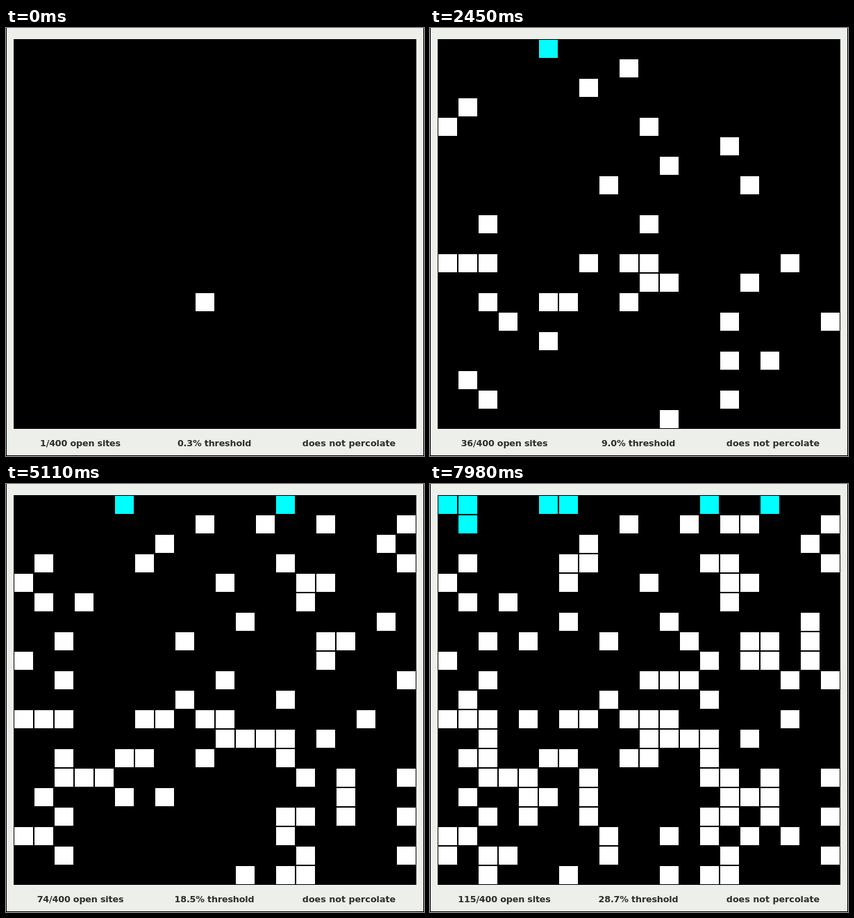
Write an HTML page with a canvas that moves like this. It is 602 px wide and 615 px high and loops after 8000 ms.

```html
<!DOCTYPE html>
<html lang="en">
<head>
<meta charset="utf-8">
<title>Percolation</title>
<style>
  html, body { margin: 0; width: 100%; height: 100%; overflow: hidden; background: #edefea; }
  canvas { display: block; }
</style>
</head>
<body>
<canvas id="stage" width="602" height="615"></canvas>
<script>
const ctx = document.getElementById('stage').getContext('2d');
const SIZE = 20, TOTAL = SIZE * SIZE;
const LOOP = 8000, STEP = 70;

// Sites in the order they open, as row * SIZE + column.
const order = [
  269, 334, 182, 61, 250, 155, 29, 237, 305, 262, 114, 341, 229,
  90, 283, 299, 222, 336, 251, 374, 148, 220, 265, 190, 47,
  255, 362, 5, 230, 131, 294, 80, 391, 221, 266, 227, 253,
  307, 32, 142, 296, 101, 58, 353, 175, 208, 94, 322, 138,
  316, 199, 66, 393, 301, 35, 339, 213, 103, 73, 79, 284,
  340, 95, 379, 273, 160, 394, 13, 226, 39, 282, 156, 333,
  252, 363, 21, 386, 74, 6, 324, 192, 261, 270, 348, 176,
  242, 34, 191, 0, 315, 382, 173, 357, 1, 287, 368, 351,
  178, 197, 327, 152, 201, 293, 67, 224, 355, 126, 314, 231,
  158, 304, 16, 86, 360, 144
];

// Open sites connected to the top row.
function findFull(open) {
  const full = new Set();
  const visit = (row, col) => {
    const site = row * SIZE + col;
    if (row < 0 || col < 0 || row >= SIZE || col >= SIZE) return;
    if (!open.has(site) || full.has(site)) return;
    full.add(site);
    visit(row - 1, col);
    visit(row + 1, col);
    visit(row, col - 1);
    visit(row, col + 1);
  };
  for (let col = 0; col < SIZE; col++) visit(0, col);
  return full;
}

function box(color, x, y, w, h) {
  ctx.fillStyle = color;
  ctx.fillRect(x, y, w, h);
}

function label(text, x, spacing) {
  ctx.letterSpacing = spacing;
  ctx.fillText(text, x, 601);
}

function draw(count) {
  const open = new Set(order.slice(0, count));
  const full = findFull(open);
  const percolates = [...full].some(site => site >= TOTAL - SIZE);

  box('#000', 0, 0, 602, 615);
  box('#edefea', 1, 0, 600, 614);
  box('#000', 11, 16, 580, 560);
  for (const site of open) {
    const row = Math.floor(site / SIZE), col = site % SIZE;
    box(full.has(site) ? '#0ff' : '#fff', 12 + col * 29, 17 + row * 28, 27, 26);
  }

  ctx.fillStyle = '#2e2e2e';
  ctx.font = 'bold 12.7px "DejaVu Sans", sans-serif';
  ctx.textAlign = 'center';
  label(`${count}/${TOTAL} open sites`, 107, '-0.15px');
  label(`${(count / TOTAL * 100).toFixed(1)}% threshold`, 300, '-0.15px');
  label(percolates ? 'percolates' : 'does not percolate', 494, '0px');
}

const start = performance.now();
let shown = 0;

function tick() {
  const time = (performance.now() - start) % LOOP;
  const count = Math.min(order.length, Math.floor(time / STEP) + 1);
  if (count !== shown) draw(shown = count);
  requestAnimationFrame(tick);
}
tick();
</script>
</body>
</html>
```
